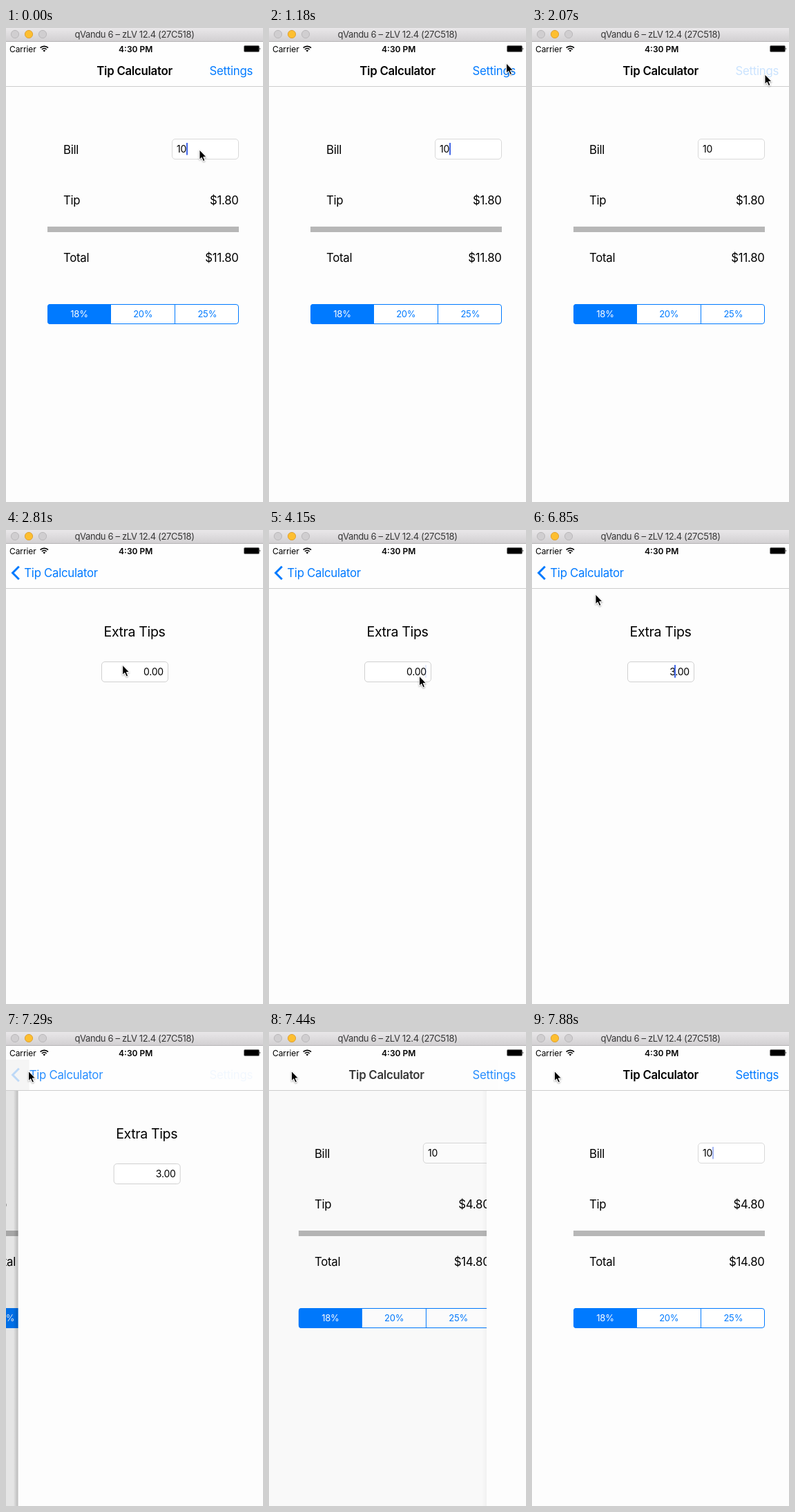
Animation of 372x685 px, one loop 8 s. Source, as an HTML page:

```html
<!DOCTYPE html>
<html lang="en">
<head>
<meta charset="utf-8">
<title>Tip Calculator</title>
<style>
  html, body { margin: 0; width: 100%; height: 100%; overflow: hidden; background: #fdfdfd; }
  svg { display: block; width: 372px; height: 685px; }
  text { font: 16.8px Inter, "Liberation Sans", sans-serif; letter-spacing: -.27px; white-space: pre; }
  .end { text-anchor: end; }
  .mid { text-anchor: middle; }
  .bold { font-weight: 600; }
  .blue { fill: #007aff; }
  .small { font-size: 12px; letter-spacing: -.1px; }
  .field { font-size: 14px; letter-spacing: -.2px; }
  .seg { font-size: 13px; letter-spacing: -.2px; }
  .head { font-size: 19.6px; letter-spacing: -.4px; }
  .window { font-size: 13px; letter-spacing: -.35px; fill: #363636; }
  .box { fill: #fff; stroke: #d9d9d9; }
  .caret { fill: #4166e6; }
</style>
</head>
<body>
<svg viewBox="0 0 372 685">
  <defs>
    <linearGradient id="chrome" x2="0" y2="1">
      <stop stop-color="#e9e7e9"/><stop offset="1" stop-color="#d1cfd1"/>
    </linearGradient>
    <linearGradient id="edge">
      <stop stop-opacity="0"/><stop offset="1" stop-opacity=".2"/>
    </linearGradient>
    <filter id="drop" x="-50%" y="-50%" width="200%" height="200%">
      <feDropShadow dx="0" dy="1" stdDeviation="1" flood-opacity=".4"/>
    </filter>
  </defs>

  <rect width="372" height="685" fill="#fdfdfd"/>

  <g id="main">
    <text x="83" y="181.5">Bill</text>
    <rect class="box" x="240.5" y="160.5" width="96" height="29" rx="4.5"/>
    <text class="field" x="247" y="180">10</text>
    <rect id="billCaret" class="caret" x="261" y="166" width="2" height="17.5"/>
    <text x="83" y="254.5">Tip</text>
    <text id="tip" class="end" x="336.6" y="254.5"></text>
    <rect x="60" y="287" width="277" height="8" fill="#b7b7b7"/>
    <text x="83" y="337.5">Total</text>
    <text id="total" class="end" x="336.6" y="337.5"></text>
    <rect x="60.5" y="399.5" width="276" height="28" rx="3.5" fill="#fff" stroke="#007aff"/>
    <path class="blue" d="M152 399H64a4 4 0 0 0-4 4v21a4 4 0 0 0 4 4h88z"/>
    <rect class="blue" x="244" y="399" width="1" height="29"/>
    <text class="seg mid" x="106" y="418" fill="#fff">18%</text>
    <text class="seg mid blue" x="198.3" y="418">20%</text>
    <text class="seg mid blue" x="291.3" y="418">25%</text>
  </g>
  <rect id="dim" y="84" width="372" height="601"/>

  <g id="extra">
    <rect id="shade" x="-7" y="84" width="7" height="601" fill="url(#edge)"/>
    <rect y="84" width="372" height="601" fill="#fdfdfd"/>
    <text class="head mid" x="186" y="154">Extra Tips</text>
    <rect class="box" x="138.5" y="190.5" width="96" height="29" rx="4.5" style="stroke:#d0d0d0"/>
    <text id="amount" class="field end" x="228" y="210"></text>
    <rect id="extraCaret" class="caret" y="195" width="2" height="18.5"/>
  </g>

  <rect y="20" width="372" height="64" fill="#fefefe"/>
  <rect id="haze" y="40" height="44"/>
  <rect y="84" width="372" height="1" fill="#cdcdcd"/>
  <text id="title" class="bold" x="131.3" y="68">Tip Calculator</text>
  <text id="back" class="blue" x="26.3" y="68">Tip Calculator</text>
  <path id="chevron" d="M18.8 52.8L9.6 62l9.2 9.2" fill="none" stroke="#007aff" stroke-width="3"/>
  <text id="settings" class="blue end" x="357" y="68">Settings</text>

  <text class="small" x="5" y="34.5">Carrier</text>
  <g fill="none" stroke="#000" stroke-width="1.7">
    <path d="M49.6 28.6a8.2 8.2 0 0 1 11.4 0M51.9 31a5 5 0 0 1 6.8 0"/>
    <path d="M55.3 34.6l-1.9-2a2.8 2.8 0 0 1 3.8 0z" fill="#000" stroke="none"/>
  </g>
  <text class="small bold mid" x="187.7" y="34.5" style="letter-spacing:0">4:30 PM</text>
  <rect x="344.5" y="25.5" width="22" height="9" rx="1.5" fill="#333" stroke="#777" stroke-width=".8"/>
  <rect x="345.2" y="26.2" width="20.6" height="7.6" rx=".6"/>
  <path d="M367.4 28.2q1.8 1.8 0 3.6z"/>

  <rect width="372" height="20" fill="url(#chrome)"/>
  <rect y="19" width="372" height="1" fill="#b6b4b6"/>
  <g fill="#d0ced0" stroke="#bab8ba">
    <circle cx="13" cy="9" r="5.6"/>
    <circle cx="33" cy="9" r="5.6" fill="#fdbf30" stroke="#dfa134"/>
    <circle cx="53" cy="9" r="5.6"/>
  </g>
  <text class="window mid" x="186" y="14">qVandu 6 – zLV 12.4 (27C518)</text>

  <path id="cursor" d="M0 0V14.2L3.2 11.3 5.5 16.6 8 15.5 5.7 10.4H10z" stroke="#fff" stroke-width="1" filter="url(#drop)"/>
</svg>
<script>
const LOOP = 8000;
const BEAT = 148.7; // the screen refreshes once per beat; times below count beats
const PRESS = 12, PUSH = 15.66, TAP = 24, STEP_LEFT = 30, ERASE = 34, TYPE = 39,
  BACK = 48, POP = 48.885, REFOCUS = 46.6;

// Pointer strokes as quadratic curves
const strokes = [
  { start: 3, end: 11, x: [280, 368, 337], y: [176, 0, 67] },
  { start: 16, end: 21, x: [337, 76, 217.5], y: [67, 226, 211] },
  { start: 42, end: BACK, x: [217.5, 120, 32.5], y: [211, 100, 56.5] }
];

const $ = id => document.getElementById(id);
const clamp = v => Math.max(0, Math.min(1, v));
const move = (id, x, y = 0) => $(id).setAttribute('transform', `translate(${x} ${y})`);
const fade = (id, v) => $(id).setAttribute('opacity', clamp(v));
const write = (id, s) => { if ($(id).textContent !== s) $(id).textContent = s; };

const curve = ([a, b, c], s) => a * (1 - s) ** 2 + 2 * b * s * (1 - s) + c * s * s;

function pointer(k) {
  const m = strokes.filter(m => m.start <= k).pop() || strokes[0];
  const s = clamp((k - m.start) / (m.end - m.start));
  return [curve(m.x, s), curve(m.y, s)];
}

// Critically damped slide, 0 to 1
function spring(beats) {
  const x = Math.max(0, beats) * 3;
  const v = 1 - (1 + x) * Math.exp(-x);
  return v > .995 ? 1 : v;
}

// Soft blink, lit right after the last input
const blink = beats => .8 + 1.05 * Math.cos((beats - 1.5) * 2 * Math.PI / 7);

function draw(k) {
  const popping = k >= POP;
  const p = popping ? 1 - spring(k - POP) : spring(k - PUSH);
  const q = 1 - p;

  move('main', -111.6 * p);
  move('extra', 372 * q);
  fade('dim', .1 * p);
  fade('shade', p);
  $('extra').style.display = p > 0 ? '' : 'none';

  move('title', -105 * p);
  fade('title', 1 - 1.4 * p);
  move('back', Math.min(105, 155 * q));
  fade('back', 1 - 3.3 * q);
  fade('chevron', (1 - 2 * q) * (k >= BACK ? .25 : 1));
  fade('settings', q * (k >= PRESS && !popping ? .2 : 1));
  $('haze').setAttribute('width', 372 * q + 16);
  fade('haze', q > 0 ? .035 * p : 0);

  const extra = k >= TYPE ? 3 : 0;
  write('tip', '$' + (1.8 + extra).toFixed(2));
  write('total', '$' + (11.8 + extra).toFixed(2));
  write('amount', k >= ERASE && k < TYPE ? '.00' : extra.toFixed(2));

  const billFocus = k < PRESS || k > REFOCUS + 5;
  fade('billCaret', billFocus ? blink(k < PRESS ? k : k - REFOCUS) : 0);
  const input = [TAP, ERASE, TYPE].filter(b => b <= k).pop();
  fade('extraCaret', input && k < BACK ? blink(k - input) : 0);
  $('extraCaret').setAttribute('x', k < STEP_LEFT ? 226 : 206);
  move('cursor', ...pointer(k));
}

function frame(now) {
  draw(Math.floor((now % LOOP + 16) / BEAT));
  requestAnimationFrame(frame);
}
draw(0);
requestAnimationFrame(frame);
</script>
</body>
</html>
```
